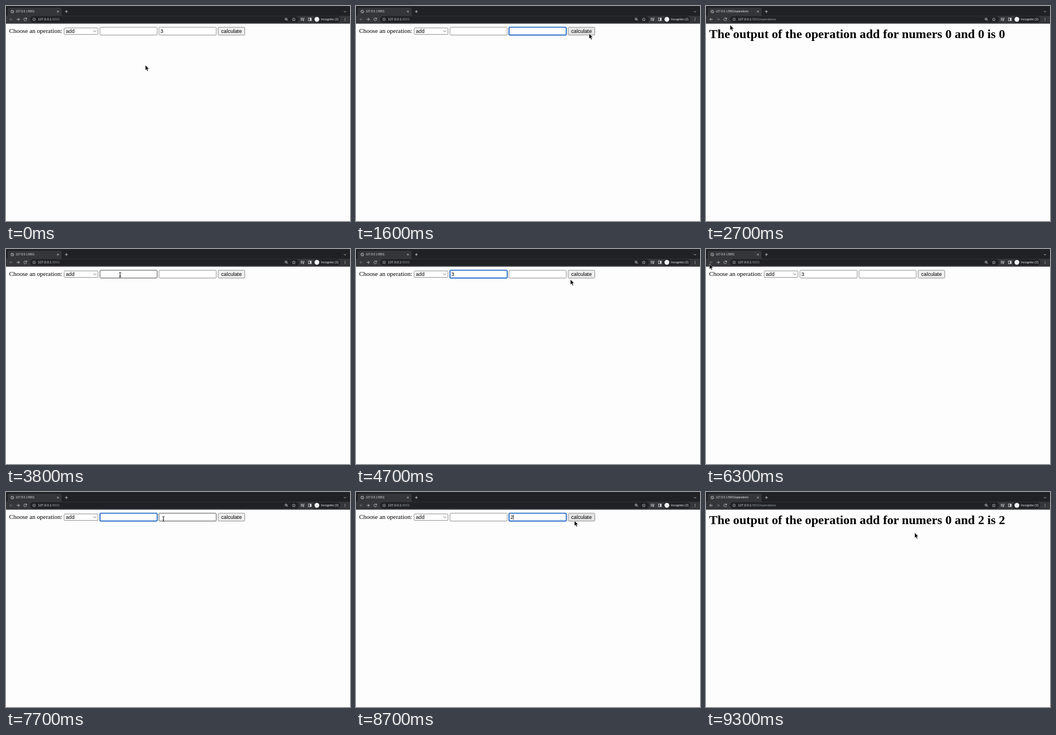
An HTML page for the animation above (9800 ms loop, 600 px wide and 375 px high).

```html
<!DOCTYPE html>
<html lang="en">
<head>
<meta charset="utf-8">
<title>Calculator form</title>
<style>
  html, body { margin: 0; width: 100%; height: 100%; overflow: hidden; background: #fdfdfd; }
  svg { display: block; }
  .ui { font-family: "Liberation Sans", Arial, sans-serif; fill: #e8eaed; }
  .icon { fill: none; stroke: #d5d7da; stroke-width: .8; }
  .page { font-family: "Liberation Serif", "Times New Roman", serif; font-size: 10.92px; }
  .control { font-family: "Liberation Sans", Arial, sans-serif; font-size: 9.1px; }
  .box { fill: #fff; stroke: #767676; stroke-width: .8; }
  h1, text { white-space: pre; }
</style>
</head>
<body>
<svg width="600" height="375" viewBox="0 0 600 375">
  <rect width="600" height="375" fill="#fdfdfd"/>

  <g id="form" class="page">
    <text x="5.46" y="47">Choose an operation:</text>
    <g class="control">
      <rect class="box" x="101.4" y="38.2" width="59" height="11.4" rx="1.5"/>
      <text x="104.3" y="47">add</text>
      <path d="M152.3 42.6l2.6 2.7 2.6-2.7" fill="none" stroke="#555" stroke-width=".8"/>
      <g class="field">
        <rect class="box" y="37" x="163.9" width="99.8" height="13.7" rx="1.5"/>
        <text x="166.2" y="47"></text>
        <path stroke="#000" stroke-width=".7"/>
      </g>
      <g class="field">
        <rect class="box" y="37" x="266.9" width="99.8" height="13.7" rx="1.5"/>
        <text x="269.2" y="47"></text>
        <path stroke="#000" stroke-width=".7"/>
      </g>
      <rect id="button" class="box" x="370" y="37" width="46.5" height="13.7" rx="1.5"/>
      <text x="375.3" y="47">calculate</text>
    </g>
  </g>
  <text id="result" class="page" x="5.46" y="56" style="font-size:21.84px;font-weight:bold"></text>

  <g class="ui">
    <rect width="600" height="30.5" fill="#202124"/>
    <path d="M0 17h1q2 0 2-2V6q0-3 3-3h88q3 0 3 3v9q0 2 2 2h501v13.5H0z" fill="#35363a"/>
    <rect x="42" y="17.8" width="469" height="11" rx="5.5" fill="#202124"/>
    <g class="icon">
      <circle cx="11" cy="9.7" r="2.4"/>
      <path d="M9.3 8l3.4 3.4" stroke-width=".6"/>
      <path d="M89 8.2l3 3m0-3l-3 3M102.8 9.7h5m-2.5-2.5v5M589.3 8.8l2 2 2-2"/>
      <path id="back" d="M11.6 23.3H6.7m2.3-2.4l-2.4 2.4 2.4 2.4"/>
      <path id="forward" d="M18.5 23.3h4.9m-2.3-2.4l2.4 2.4-2.4 2.4"/>
      <path d="M35.6 22a2.4 2.4 0 1 0 .3 2M36 20.4v2h-2"/>
      <circle cx="49" cy="23.3" r="2.3" stroke-width=".6"/>
      <path d="M49 22.9v1.6m0-2.8v.6" stroke-width=".6"/>
      <circle cx="488.5" cy="22.7" r="1.8"/>
      <path d="M489.9 24.1l1.8 1.8M487.6 22.7h1.8" stroke-width=".7"/>
      <path d="M502 20.6l.8 1.8 2 .2-1.5 1.4.4 2-1.7-1-1.7 1 .4-2-1.5-1.4 2-.2z" stroke-width=".6"/>
      <path d="M514 21.3h4.3M514 23h4.3M514 24.7h2.5M519.3 25v-3.9h1.4"/>
      <circle cx="518.4" cy="25" r=".8"/>
      <rect x="527.4" y="20.9" width="5" height="4.8"/>
      <path d="M531.2 21v4.6" stroke-width="2.2"/>
    </g>
    <rect x="536" y="17.8" width="47" height="11" rx="5.5" fill="#202124"/>
    <circle cx="542.2" cy="23.3" r="4.2" fill="#f1f3f4"/>
    <g fill="#d5d7da">
      <circle cx="591.3" cy="21.3" r=".6"/><circle cx="591.3" cy="23.3" r=".6"/><circle cx="591.3" cy="25.3" r=".6"/>
    </g>
    <text id="tab" x="17" y="11.4" font-size="4.9"></text>
    <text x="55.8" y="25.3" font-size="5.7">127.0.0.1<tspan id="path" fill="#9aa0a6"></tspan></text>
    <text x="549.3" y="25.3" font-size="5.55">Incognito (2)</text>
  </g>

  <g id="cursor" stroke-linejoin="round">
    <path id="arrow" d="M0 0v9.3l2.1-1.9 1.5 3.4 1.6-.7-1.5-3.3h2.9z" stroke="#fff" stroke-width=".6"/>
    <g id="beam" fill="none">
      <path d="M-1.8-4.2Q0-4.2 0-3Q0-4.2 1.8-4.2M0-3V3M-1.8 4.2Q0 4.2 0 3Q0 4.2 1.8 4.2M-1 1.6h2" stroke="#fff" stroke-width="1.8"/>
      <path d="M-1.8-4.2Q0-4.2 0-3Q0-4.2 1.8-4.2M0-3V3M-1.8 4.2Q0 4.2 0 3Q0 4.2 1.8 4.2M-1 1.6h2" stroke="#000" stroke-width=".9"/>
    </g>
  </g>
</svg>
<script>
const LOOP = 9800, STEP = 100;
const $ = id => document.getElementById(id);
const fields = [...document.querySelectorAll('.field')].map(g => [...g.children]);

// time, view, first value, second value, focused field, typed
const states = [
  [0, 'form', '', '3', 0],
  [600, 'form', '', '3', 2],
  [800, 'form', '', '', 2, true],
  [1800, 'result', '', '', 0],
  [3300, 'form', '', '', 0],
  [3900, 'form', '', '', 1],
  [4100, 'form', '3', '', 1, true],
  [5000, 'loading', '3', '', 1],
  [5100, 'result', '3', '', 0],
  [6200, 'form', '3', '', 0],
  [6900, 'form', '3', '', 1],
  [7200, 'form', '', '', 1, true],
  [8000, 'form', '', '', 2],
  [8400, 'form', '', '2', 2, true],
  [9000, 'result', '', '2', 0]
];

// time, x, y of the pointer
const moves = [
  [100, 243, 103], [500, 292, 44], [900, 292, 44], [1400, 431, 51], [1700, 398, 47],
  [1800, 398, 47], [2700, 42, 33], [3100, 6, 23], [3300, 6, 23], [3800, 199, 45],
  [4200, 199, 45], [4700, 374, 53], [4900, 379, 49], [5300, 379, 49], [6000, 6, 26],
  [6300, 6, 26], [6500, 101.6, 45], [6600, 101.6, 45], [6900, 259, 43], [7600, 259, 43],
  [7800, 290, 51], [8000, 300, 45], [8300, 300, 45], [8700, 381, 50], [8900, 386, 46],
  [9000, 384, 48], [9300, 364, 71]
];

function pointerAt(t) {
  const next = moves.findIndex(m => m[0] > t);
  if (next === 0) return moves[0].slice(1);
  if (next < 0) return moves[moves.length - 1].slice(1);
  const [t0, x0, y0] = moves[next - 1], [t1, x1, y1] = moves[next];
  const u = (t - t0) / (t1 - t0), k = u * u * (3 - 2 * u);
  return [x0 + (x1 - x0) * k, y0 + (y1 - y0) * k];
}

const show = (el, on) => el.setAttribute('visibility', on ? 'visible' : 'hidden');
const inside = (x, y, left, top, right, bottom) => x > left && x < right && y > top && y < bottom;

function draw(t) {
  const [since, view, first, second, focus, typed] = states.findLast(s => s[0] <= t);
  const [x, y] = pointerAt(t);
  const onForm = view !== 'result', address = view === 'form' ? ':5001' : ':5001/operations';
  const a = +first, b = +second;
  let overText = onForm ? inside(x, y, 5, 39, 98, 50) : inside(x, y, 5, 40, 523, 60);

  $('form').style.display = onForm ? '' : 'none';
  $('result').textContent = onForm ? '' :
    `The output of the operation add for numers ${a} and ${b} is ${a + b}`;
  $('tab').textContent = '127.0.0.1' + address;
  $('path').textContent = address;
  $('back').style.opacity = view === 'form' ? .4 : 1;
  $('forward').style.opacity = view === 'form' ? 1 : .4;

  fields.forEach(([box, text, caret], i) => {
    const left = 163.5 + 103 * i, focused = focus === i + 1;
    const hover = onForm && inside(x, y, left, 36.6, left + 100.6, 51);
    const value = [first, second][i];
    overText ||= hover;
    text.textContent = value;
    box.style.stroke = focused ? '#1661c4' : hover ? '#222' : '#767676';
    box.style.strokeWidth = focused ? 1.7 : .8;
    caret.setAttribute('d', `M${left + 3 + value.length * 5.06} 39.3v9.2`);
    caret.style.display = focused && (t - since) % 1000 < 500 ? '' : 'none';
  });
  $('button').style.fill = inside(x, y, 369.6, 36.6, 417, 51) ? '#e5e5e5' : '#efefef';

  // Typing hides the pointer until it moves again
  const hidden = typed && pointerAt(since)[0] === x;
  show($('arrow'), !hidden && !overText);
  show($('beam'), !hidden && overText);
  $('cursor').setAttribute('transform', `translate(${x} ${y})`);
}

const start = performance.now();
function frame() {
  const t = (performance.now() - start) % LOOP;
  draw(Math.floor(t / STEP) * STEP);
  requestAnimationFrame(frame);
}
frame();
</script>
</body>
</html>
```
